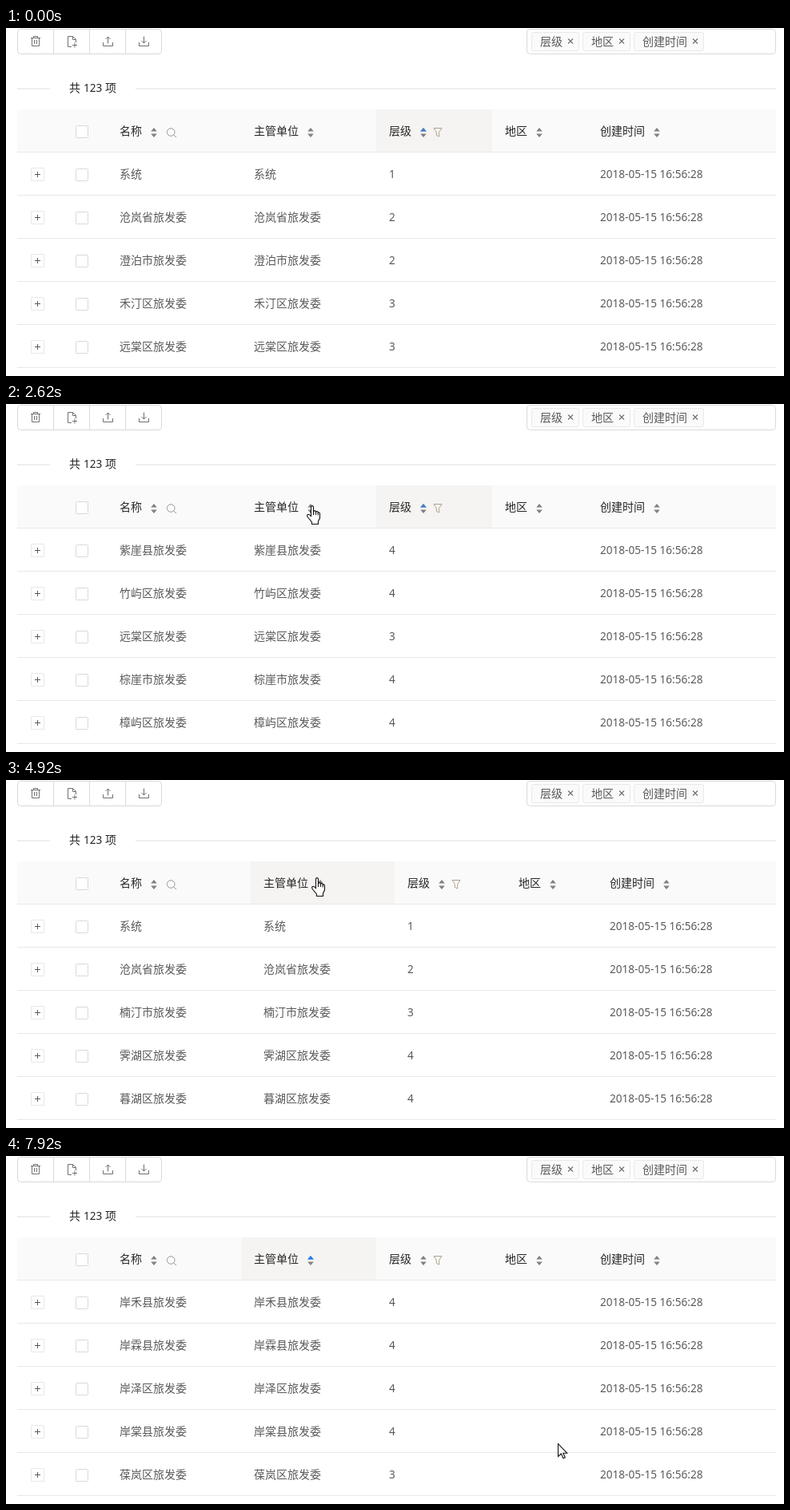
Animation, 973 px wide and 436 px high, one loop 8 s. Source, as an HTML page with a canvas:

```html
<!DOCTYPE html>
<html lang="zh-CN">
<head>
<meta charset="utf-8">
<title>Sortable table</title>
<style>
html, body { margin: 0; width: 100%; height: 100%; overflow: hidden; background: #fff; }
canvas { display: block; width: 973px; height: 436px; }
</style>
</head>
<body>
<canvas id="stage" width="973" height="436"></canvas>
<script>
const g = document.getElementById('stage').getContext('2d');
const LOOP = 8000, FADE = 300, STEP = 110, LAG = 60;
const DESC = 2610, NONE = 4920, ASC = 6240;   // sort clicks
const SHOW = 520;                             // pointer appears
const TOP = 156, ROW = 54;
const CJK = '14px "Noto Sans CJK SC", "Noto Sans CJK", sans-serif';
const LATIN = '13.6px "Noto Sans", "Open Sans", sans-serif';
const INK = '#262626', BODY = '#595959', LINE = '#e8e8e8', EDGE = '#d9d9d9';
const GREY = '#808080', ICON = '#707070', BLUE = '#1283fa';
const DATE = '2018-05-15 16:56:28';

// Pointer way-points: time, left, top
const PATH = [
  [450, 760, 440], [600, 690, 360], [850, 616, 309], [1290, 414, 147], [1500, 412, 147],
  [1610, 396, 135], [2050, 376, 127], [3150, 376, 127], [3490, 380, 157], [3600, 382, 163],
  [3930, 380, 146], [4700, 382, 122], [5690, 383, 121], [6080, 391, 120], [7450, 391, 120],
  [7890, 379, 136]
];

const office = place => place === '系统' ? place : place + '旅发委';
const page = (places, levels) => places.split(' ').map((p, i) => [office(p), levels[i]]);
const PAGES = {
  level: page('系统 沧岚省 澄泊市 禾汀区 远棠区', '12233'),
  desc: page('紫崖县 竹屿区 远棠区 棕崖市 樟屿区', '44344'),
  none: page('系统 沧岚省 楠汀市 霁湖区 暮湖区', '12344'),
  asc: page('岸禾县 岸霖县 岸泽区 岸棠县 葆岚区', '44443')
};

const ARROW = new Path2D('M.5 .5V16.5L4.3 13L7 18.7L9.3 17.7L6.8 12.2H11.7Z');
const HAND = new Path2D('M5.5 13.5V2.5Q5.5 .6 7 .6T8.5 2.5V8Q9 6.4 10.2 6.6T11.6 8.4Q12.2 7.2 13.2 7.6T14.3 9.4' +
  'Q15 8.5 15.8 9T16.5 11V16L14.5 20V23.5H6.5V21L1.2 14.5Q0 12.3 1.4 11.5T5.5 13.5Z');
const KNUCKLES = new Path2D('M8.5 8V12M11.6 8.5V12M14.3 9.5V12.5');
const TRASH = new Path2D('M31 12.5H43M34.5 12V10.5H39.5V12M32.5 12.5V22.5H41.5V12.5M35.5 15V20M38.5 15V20');
const FILE = new Path2D('M82 23.5H77.5V10.5H83.5L87.5 14.5V18M83.5 10.5V14.5H87.5M83 21.5H89M86 18.5V24.5');
const UPLOAD = new Path2D('M121.5 18V22.5H133.5V18M127.5 11V19.5M124.5 14L127.5 11L130.5 14');
const DOWNLOAD = new Path2D('M166.5 18V22.5H178.5V18M172.5 10.5V19M169.5 16L172.5 19L175.5 16');
const SEARCH = new Path2D('M211 130.5A4.8 4.8 0 1 1 201.4 130.5A4.8 4.8 0 1 1 211 130.5M209.7 134L213 137');

const clamp = v => Math.max(0, Math.min(1, v));
const ease = k => k * (2 - k);
const since = (q, t) => ease(clamp((q - t) / FADE));

// The screen refreshes in even steps
const snap = t => Math.floor((t - 80) / STEP) * STEP + 80;

function pointAt(t) {
  const i = Math.max(1, PATH.findIndex(p => p[0] > t));
  const [t0, x0, y0] = PATH[i - 1], [t1, x1, y1] = PATH[i];
  const k = clamp((t - t0) / (t1 - t0));
  return { x: Math.round(x0 + (x1 - x0) * k), y: y0 + (y1 - y0) * k };
}

// Row highlight: builds up while the pointer is inside, drains outside
function glow(q, row) {
  const dt = 10;
  let k = 0;
  for (let t = q - 3 * FADE; t < q; t += dt) {
    const inside = Math.floor((pointAt(t - LAG).y - TOP - 2) / ROW) === row;
    k = clamp(k + (inside ? dt : -dt) / FADE);
  }
  return ease(k);
}

function fill(x, y, w, h, color, alpha = 1) {
  g.globalAlpha = alpha;
  g.fillStyle = color;
  g.fillRect(x, y, w, h);
  g.globalAlpha = 1;
}

function stroke(color, path, width = 1) {
  g.strokeStyle = color;
  g.lineWidth = width;
  g.stroke(path);
}

function box(x, y, w, h, r, edge, bg = '#fff') {
  const p = new Path2D();
  p.roundRect(x + 0.5, y + 0.5, w - 1, h - 1, r);
  g.fillStyle = bg;
  g.fill(p);
  stroke(edge, p);
}

function text(s, x, y, color = BODY, font = CJK) {
  g.font = font;
  g.fillStyle = color;
  g.fillText(s, x, y);
}

function triangle(x, dir, color, alpha = 1) {
  const base = 131 + dir * 1.5;
  g.globalAlpha = alpha;
  g.fillStyle = color;
  g.beginPath();
  g.moveTo(x - 3.8, base);
  g.lineTo(x + 3.8, base);
  g.lineTo(x, base + dir * 4.6);
  g.fill();
  g.globalAlpha = 1;
}

function sorter(x, up = 0, down = 0, color = BLUE) {
  triangle(x, -1, GREY);
  triangle(x, 1, GREY);
  triangle(x, -1, color, up);
  triangle(x, 1, color, down);
}

function funnel(x) {
  stroke('#aca38e', new Path2D(`M${x - 5} 125.5H${x + 5}L${x + 1.7} 130.5V136L${x - 1.7} 134.5V130.5Z`));
}

function tag(x, label) {
  const w = 32 + label.length * 14, c = x + w - 11;
  box(x, 5, w, 24, 2, LINE, '#fafafa');
  text(label, x + 11, 22);
  stroke(ICON, new Path2D(`M${c - 3} 13.5l6 6m0 -6l-6 6`), 1.2);
  return x + w + 4;
}

function toolbar() {
  box(14, 1, 181, 32, 4, EDGE);
  for (let i = 1; i < 4; i++) fill(14 + i * 45, 1, 1, 31, EDGE);
  for (const icon of [TRASH, FILE, UPLOAD, DOWNLOAD]) stroke(ICON, icon);
  box(651, 1, 312, 32, 4, EDGE);
  ['层级', '地区', '创建时间'].reduce(tag, 657);
  fill(14, 75, 41, 2, '#eee');
  fill(162, 75, 801, 2, '#eee');
  text('共', 79, 80, INK);
  text('123', 97, 80, INK, LATIN);
  text('项', 124, 80, INK);
}

// Title followed by its sort arrows
function title(label, x, ...state) {
  text(label, x, 134, INK);
  sorter(x + label.length * 14 + 15, ...state);
}

function header(q, col) {
  const level = 1 - since(q, DESC), asc = since(q, ASC);
  const desc = since(q, DESC) - since(q, NONE);
  fill(14, 102, 949, 53, '#fafafa');
  fill(col.unit - 16, 102, col.level - col.unit, 53, '#f6f4f2', Math.max(desc, asc));
  fill(col.level - 16, 102, col.area - col.level, 53, '#f6f4f2', level);
  fill(14, 155, 949, 1, LINE);
  box(87, 122, 16, 16, 1, EDGE);
  title('名称', 142);
  title('主管单位', col.unit, asc, desc);
  title('层级', col.level, level, 0, '#3b82d0');
  title('地区', col.area);
  title('创建时间', col.date);
  stroke('#999', SEARCH);
  funnel(col.level + 61);
}

function rows(q, col, data) {
  data.forEach(([name, level], i) => {
    const top = TOP + i * ROW, y = top + 32;
    fill(14, top, 949, ROW - 1, '#e9faff', glow(q, i));
    fill(14, top + ROW - 1, 949, 1, LINE);
    box(31, top + 19, 17, 17, 0, LINE);
    fill(36, top + 27, 7, 1, BODY);
    fill(39, top + 24, 1, 7, BODY);
    box(87, top + 20, 16, 16, 1, EDGE);
    text(name, 142, y);
    text(name, col.unit, y);
    text(level, col.level, y, BODY, LATIN);
    text(DATE, col.date, y, BODY, LATIN);
  });
}

function pointer(q) {
  if (q < SHOW) return;
  const { x, y } = pointAt(q);
  const hand = x < 393 && y < TOP + 3;
  const shape = hand ? HAND : ARROW;
  g.save();
  g.translate(x, Math.round(y));
  g.fillStyle = '#fff';
  g.fill(shape);
  stroke('#111', shape, 1.1);
  if (hand) stroke('#111', KNUCKLES);
  g.restore();
}

function draw(t) {
  const q = snap(t);
  const mode = q < DESC ? 'level' : q < NONE ? 'desc' : q < ASC ? 'none' : 'asc';
  const col = mode === 'none'
    ? { unit: 322, level: 502, area: 641, date: 755 }
    : { unit: 310, level: 479, area: 624, date: 743 };
  fill(0, 0, 973, 436, '#fff');
  toolbar();
  header(q, col);
  rows(q, col, PAGES[mode]);
  pointer(q);
}

const start = performance.now();
function tick() {
  draw((performance.now() - start) % LOOP);
  requestAnimationFrame(tick);
}
tick();
</script>
</body>
</html>
```
